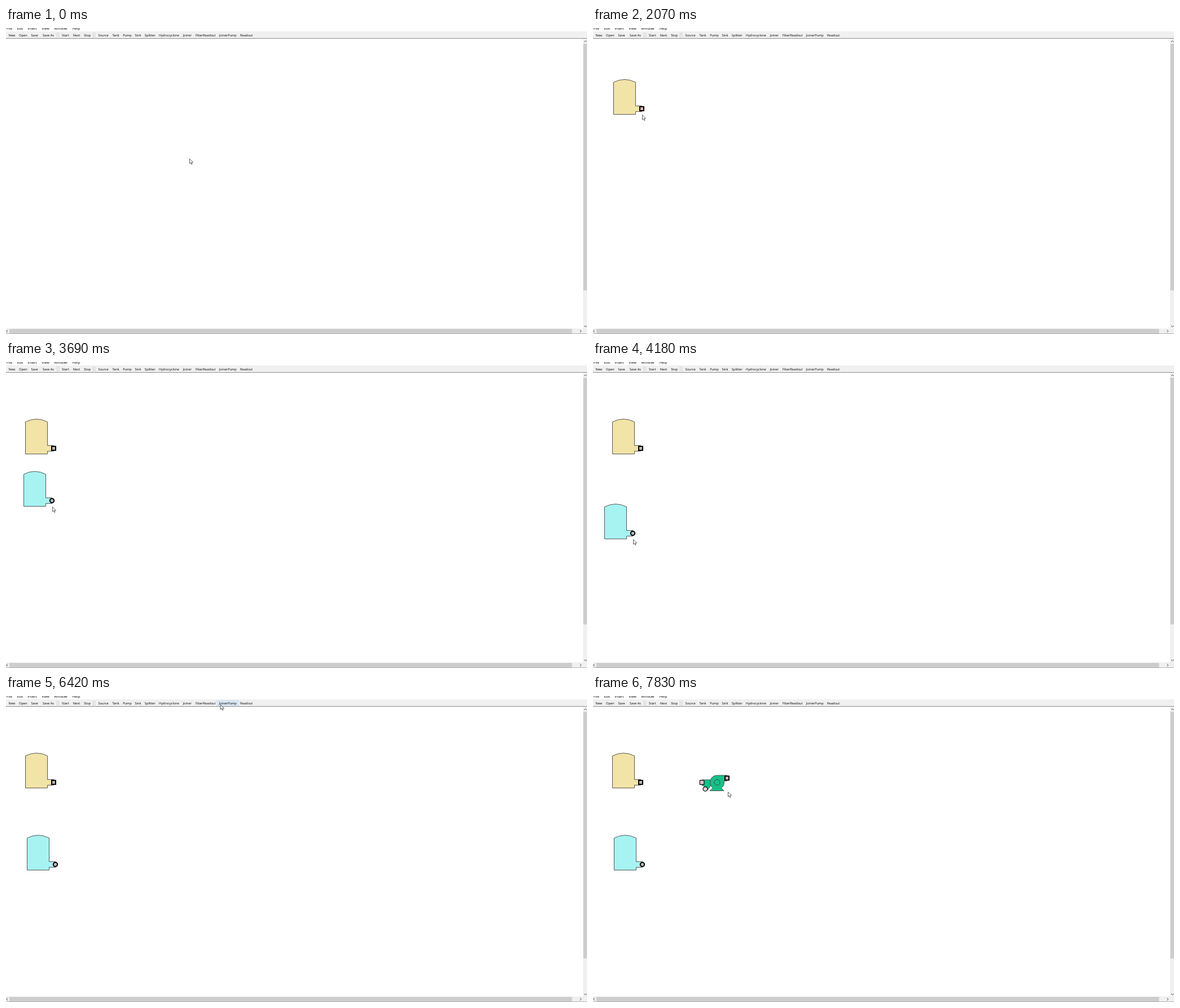
Recreate the animation shown at these times as an HTML page. Size 1030x544 px, loop 8000 ms.

```html
<!DOCTYPE html>
<html lang="en">
<head>
<meta charset="utf-8">
<title>Flow editor</title>
<style>
html, body { margin: 0; width: 100%; height: 100%; overflow: hidden; background: #fff; }
svg { display: block; width: 100%; height: 100%; }
text { font: 5.7px "Open Sans", "Noto Sans", sans-serif; text-anchor: middle; text-rendering: geometricPrecision; }
#menu text { font-size: 6.2px; }
.body { stroke: #3c3c3c; stroke-width: .85; }
.port { fill: #b9b4b4; stroke: #000; stroke-width: 2; }
.active .port { fill: #d9b3b6; }
.inlet { fill: #fff; stroke: #111; stroke-width: 1.4; }
.dot { fill: #f0a8ac; }
.bar { fill: #f0f0f0; }
.thumb { fill: #cdcdcd; }
.arrow { fill: none; stroke: #505050; }
.sep { stroke: #c8c8c8; stroke-width: .8; }
</style>
</head>
<body>
<svg viewBox="0 0 1030 544">
  <defs>
    <path id="vessel" class="body" d="M-50 10V-47Q-30.5-57-11-47V-5H0V5H-11V10Z"/>
  </defs>

  <g id="source" fill="#f2e3a7">
    <use href="#vessel"/>
    <rect class="port" x="-3.5" y="-3.5" width="7" height="7"/>
  </g>
  <g id="tank" fill="#a7f3f2">
    <use href="#vessel"/>
    <circle class="port" r="3.7"/>
  </g>
  <g id="pump" class="active" fill="#17c088">
    <path class="body" d="M-46-21H-30V-11L-35-4H-40L-43-11H-46Z"/>
    <path class="body" d="M-1.5-29H-19A12.5 12.5 0 0 0-26.5-6.5L-32-1.5H-7L-11.5-6.5A12.5 12.5 0 0 0-6.8-19H-1.5Z"/>
    <circle class="body" cx="-19" cy="-16.5" r="5"/>
    <rect class="port" x="-5" y="-27.5" width="7" height="7"/>
    <rect class="inlet" x="-49.5" y="-20" width="7.2" height="7.2"/>
    <rect class="dot" x="-47.6" y="-18.5" width="3.6" height="4.2"/>
    <circle class="inlet" cx="-40" cy="-4.7" r="3.8"/>
    <circle class="dot" cx="-40" cy="-4.7" r="1.8"/>
  </g>

  <rect width="1030" height="6" fill="#fff"/>
  <rect class="bar" y="6" width="1030" height="12"/>
  <rect y="18" width="1030" height="1" fill="#8c8c8c"/>
  <g id="menu"></g>
  <rect id="hover" y="7" height="11" fill="#d8e6f2"/>
  <g id="tools"></g>
  <path class="sep" d="M90.5 8V17M93.5 8V17M154.5 8V17M157.5 8V17"/>

  <rect class="bar" x="1023" y="19" width="7" height="525"/>
  <rect class="bar" y="534" width="1030" height="10"/>
  <rect class="thumb" x="1023.5" y="28" width="6.5" height="438.5"/>
  <rect class="thumb" x="6" y="535" width="997.5" height="8"/>
  <rect y="543" width="1030" height="1" fill="#b4b4b4"/>
  <path class="arrow" d="M1025 25L1027.3 22.5 1029.6 25M1025 529L1027.3 531.5 1029.6 529M3 536.7L.8 539 3 541.3M1017.5 536.7L1019.8 539 1017.5 541.3"/>

  <path id="cursor" d="M.5.6V9L2.4 7.3 3.9 10.5 5.2 9.9 3.8 6.8H6.5Z" fill="#fff" stroke="#222" stroke-width=".7"/>
</svg>
<script>
const LOOP = 8000;
const STEP = 77; // usual time between screen updates
const PAD = 3.5; // space beside a tool label
const $ = id => document.getElementById(id);

// labels with the x of their centre
const menu = { File: 6, Edit: 25, Insert: 46.7, View: 70, Window: 97, Help: 124.5 };
const tools = {
  New: 10.5, Open: 30.4, Save: 50.6, "Save As": 75, Start: 105.4, Next: 125, Stop: 144.2,
  Source: 172.5, Tank: 194.6, Pump: 215, Sink: 234, Splitter: 255.3, Hydrocyclone: 289,
  Joiner: 321.3, FiberReadout: 353.8, JoinerPump: 393.3, Readout: 426.2
};

// each hand movement is a curve from the place the cursor last rested
const START = [325, 232];
const moves = [
  { from: 830, until: 1510, bend: [92, 40], to: [168, 11] },
  { from: 1660, until: 2150, bend: [87, 135], to: [85, 164] },
  { from: 2530, until: 3300, bend: [203, -6], to: [192, 12] },
  { from: 3450, until: 3690, bend: [140, 130], to: [82, 257] },
  { from: 3770, until: 4250, bend: [48, 330], to: [78, 312] },
  { from: 4340, until: 4650, bend: [82, 310], to: [85, 309] },
  { from: 5120, until: 5270, bend: [88, 309], to: [88, 310] },
  { from: 5420, until: 5420, bend: [85, 306], to: [82, 303] },
  { from: 5590, until: 5740, bend: [95, 310], to: [254, 51] },
  { from: 5910, until: 6660, bend: [386, 12], to: [393, 12] },
  { from: 6740, until: 7280, bend: [290, 150], to: [228, 170] },
  { from: 7430, until: 7830, bend: [234, 171], to: [239, 170] }
];

function addLabels(id, labels, y) {
  return Object.entries(labels).map(([label, x]) => {
    const el = document.createElementNS("http://www.w3.org/2000/svg", "text");
    el.setAttribute("x", x);
    el.setAttribute("y", y);
    el.textContent = label;
    $(id).append(el);
    return el;
  });
}

// share of a move done at time t, in whole screen updates
function progress({ from, until }, t) {
  const gaps = Math.round((until - from) / STEP);
  const done = gaps ? Math.floor((t - from) / (until - from) * gaps + 0.22) : 0;
  return (Math.min(done, gaps) + 1) / (gaps + 1);
}

function cursorAt(t) {
  let rest = START;
  for (const move of moves) {
    if (t < move.from) break;
    const u = progress(move, t), v = 1 - u;
    rest = rest.map((a, i) => Math.round(v * v * a + 2 * u * v * move.bend[i] + u * u * move.to[i]));
  }
  return rest;
}

function place(id, [x, y], shown = true) {
  $(id).setAttribute("transform", `translate(${x} ${y})`);
  $(id).style.display = shown ? "" : "none";
}

// a vessel hangs on the cursor by its port until it is dropped
function drag(id, t, picked, dropped) {
  const [x, y] = cursorAt(Math.min(t, dropped));
  place(id, [x - 0.5, y - 10.5], t >= picked);
}

function highlight([x, y]) {
  const box = y < 18 && buttons.map(el => el.getBBox())
    .find(b => x >= b.x - PAD && x < b.x + b.width + PAD);
  $("hover").style.display = box ? "" : "none";
  if (!box) return;
  $("hover").setAttribute("x", box.x - PAD);
  $("hover").setAttribute("width", box.width + 2 * PAD);
}

function draw(t) {
  const tip = cursorAt(t);
  drag("source", t, 1660, 2150);
  drag("tank", t, 3450, 5270);
  place("pump", tip, t >= 6740);
  place("cursor", tip);
  $("source").classList.toggle("active", t < 2530);
  $("tank").classList.toggle("active", t >= 4340 && t < 5590);
  highlight(tip);
}

addLabels("menu", menu, 3);
const buttons = addLabels("tools", tools, 14.6);

const began = performance.now();
function tick() {
  draw((performance.now() - began) % LOOP);
  requestAnimationFrame(tick);
}
tick();
</script>
</body>
</html>
```
